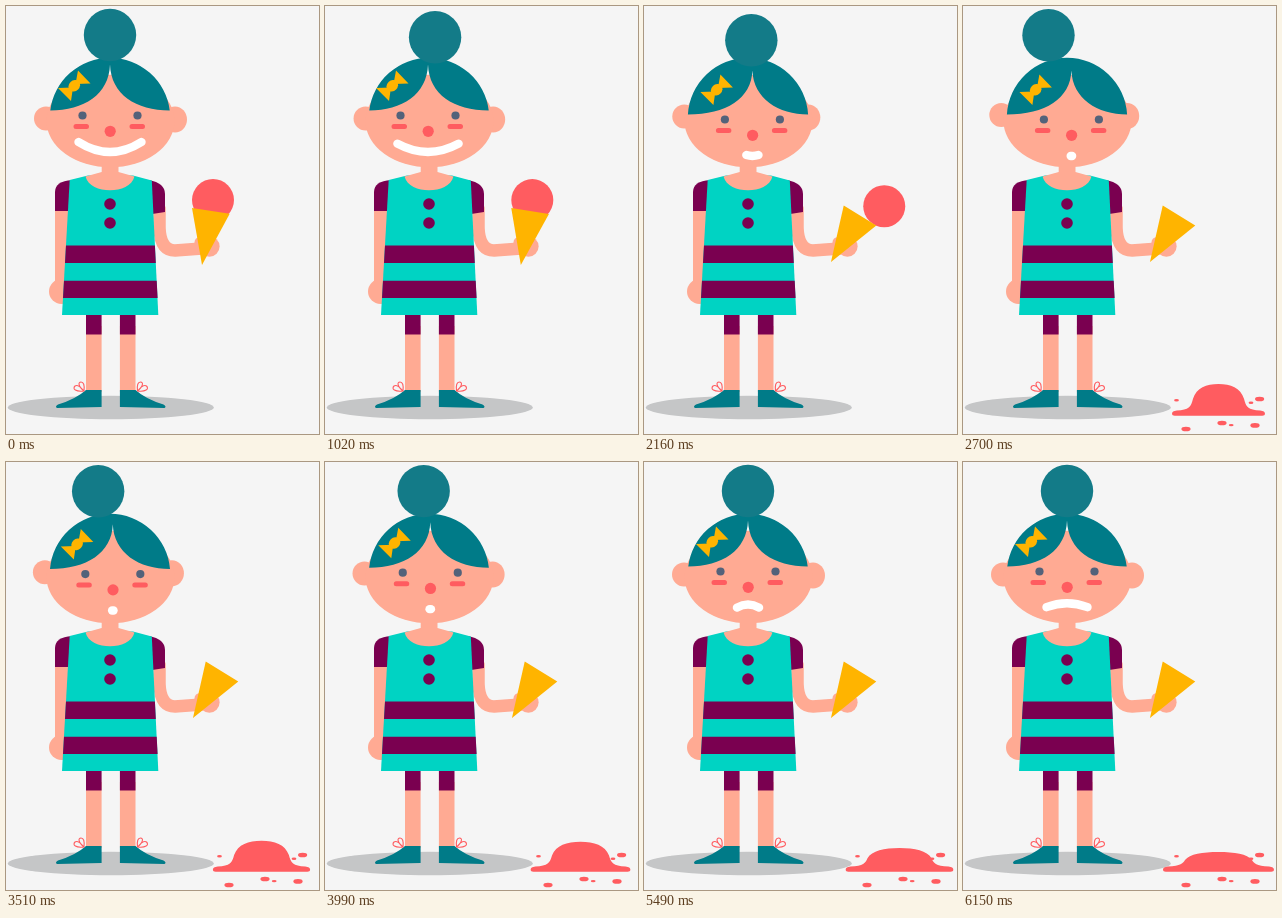
An HTML page that plays this animation: 313x428 px, repeating every 6300 ms.

```html
<!DOCTYPE html>
<html lang="en">
<head>
<meta charset="utf-8">
<title>Dropped ice cream</title>
<style>
  html, body { margin: 0; width: 100%; height: 100%; overflow: hidden; background: #f5f5f5; }
  svg { display: block; width: 100%; height: 100%; }
  .skin { fill: #ffaa93; }
  .teal { fill: #007b88; }
  .bun { fill: #137b88; }
  .plum { fill: #7a0050; }
  .red { fill: #ff5c60; }
  .gold { fill: #ffb400; }
  .eye { fill: #53627a; }
  .line { fill: none; stroke-linecap: round; }
</style>
</head>
<body>
<svg viewBox="0 0 313 428">
  <ellipse cx="104.8" cy="401.5" rx="103" ry="11.7" fill="#c5c6c7"/>

  <g id="leg">
    <path class="skin" d="M80 320H95.6V386H80Z"/>
    <path class="plum" d="M80 305H95.6V328.5H80Z"/>
    <path class="teal" d="M80 384H95.6V401L51 402Q48.500 400.500 52 398.500Q70 393 80 384Z"/>
    <path class="line" stroke="#ff5c60" stroke-width="1.1"
      d="M78 385C70 386 66 383 69 380Q72 378 78 385C72 380 72 376 75 376Q79 376 78 385"/>
  </g>
  <use href="#leg" transform="matrix(-1 0 0 1 209.500 0)"/>

  <g id="arms">
    <path class="skin" d="M49 200H62V292H49Z"/>
    <circle class="skin" cx="55.500" cy="285.500" r="12.500"/>
    <path class="line" d="M153.500 203V222Q154.500 244.500 169 244.500L196 242.500" stroke="#ffaa93" stroke-width="12.500"/>
    <circle class="skin" cx="203.400" cy="240.500" r="10.200"/>
    <circle class="skin" cx="194" cy="236.500" r="5.500"/>
    <path class="plum" d="M66 174Q49 175 49 186V205H66Z"/>
    <path class="plum" d="M143 174Q159 177 159 188V206L143 208.500Z"/>
  </g>

  <g id="dress">
    <path fill="#00d3c3" d="M63.700 174L82 169.500H127L145.800 174.500L152.300 309H56Z"/>
    <path class="plum" d="M60 239.500H148.900L149.800 257H59ZM58 274.800H150.700L151.600 292H57Z"/>
    <circle class="plum" cx="104" cy="198" r="5.800"/>
    <circle class="plum" cx="104" cy="217" r="5.800"/>
    <path class="skin" d="M95.700 155H112.500V166L128.500 170.500C126 180 115 184.300 104 184.300S82 180 79.500 170.500L95.700 166Z"/>
  </g>

  <g id="head">
    <ellipse id="earL" class="skin" cx="40" cy="112.500" rx="12" ry="12"/>
    <ellipse id="earR" class="skin" cx="169" cy="113.500" rx="12" ry="13"/>
    <ellipse class="skin" cx="104.500" cy="115" rx="64" ry="46.300"/>
    <path id="hair" class="teal"/>
    <circle id="bun" class="bun" r="26.200"/>
    <g id="face">
      <path class="gold" d="M69.500 78L72 64.500L84.500 77.500ZM67 81.500L65 95L52 82Z"/>
      <ellipse class="gold" cx="68.300" cy="79.800" rx="6.300" ry="5.300" transform="rotate(-45 68.300 79.800)"/>
      <circle class="eye" cx="76.500" cy="109.500" r="4.100"/>
      <circle class="eye" cx="131.500" cy="109.500" r="4.100"/>
      <path class="line" d="M70 120.500H80.500M126 120.500H136.500" stroke="#ff5c60" stroke-width="5"/>
      <circle class="red" cx="104.200" cy="125.300" r="5.600"/>
      <path id="mouth" class="line" stroke="#fff" stroke-width="8.400"/>
    </g>
  </g>

  <circle id="scoop" class="red" r="21"/>
  <path id="cone" class="gold" d="M186 202L223.700 207.800L196 259Z"/>
  <path id="puddle" class="red"/>
  <g id="drops" class="red"></g>
</svg>
<script>
const LOOP = 6300;
// Moments of the story, in ms
const START = 840, LEANED = 1500, TIPPED = 2160, LANDED = 2520, SPLAT = 2700;
const CALM = 4700, SAD = 4800, END = 6120;
const PIVOT = { x: 199, y: 235 };
const BIG_DROPS = [[296.6, 393], [292, 419.4], [259, 417], [223, 423]];
const SMALL_DROPS = [[213.5, 394.3], [288, 396.7], [268.2, 419.1]];

const el = Object.fromEntries([...document.querySelectorAll("[id]")].map(n => [n.id, n]));
const set = (node, attrs) => Object.entries(attrs).forEach(([k, v]) => node.setAttribute(k, v));
const span = (t, a, b) => Math.min(1, Math.max(0, (t - a) / (b - a)));
const mix = (a, b, u) => a + (b - a) * u;
const ease = (t, a, b) => {
  const u = span(t, a, b);
  return u * u * (3 - 2 * u);
};

function makeDrop([x, y], r) {
  const node = document.createElementNS("http://www.w3.org/2000/svg", "ellipse");
  set(node, { rx: r, ry: r / 2 });
  el.drops.append(node);
  return { node, x, y };
}
const drops = [...BIG_DROPS.map(p => makeDrop(p, 4.6)), ...SMALL_DROPS.map(p => makeDrop(p, 2.4))];

// From rest to one side, over to the other, and back to rest
function sway(t, rest, first, second, arrival = SPLAT) {
  const out = mix(rest, first, ease(t, START, LEANED));
  const over = mix(out, second, ease(t, LEANED, arrival));
  return mix(over, rest, ease(t, SPLAT, CALM));
}

function drawHead(t) {
  const fx = sway(t, 0, -5.4, 4.4, TIPPED);
  const fy = sway(t, 0, 0, 4, TIPPED);
  const lift = sway(t, 0, 0, -3.5);
  set(el.bun, { cx: sway(t, 104, 137, 85.5), cy: sway(t, 29, 41, 29.3) });
  set(el.earL, { transform: `translate(${sway(t, 0, 3, -1.7)} ${lift})` });
  set(el.earR, { transform: `translate(${sway(t, 0, -4.5, -4.8)} ${lift})` });
  set(el.face, { transform: `translate(${fx} ${fy})` });

  const radius = 60.2, center = 112;
  const base = 104.5 + fy;
  const half = Math.sqrt(radius ** 2 - (center - base) ** 2);
  const [left, right] = [104 - half, 104 + half];
  const px = 104 + fx, py = 58.5 + fy * 1.5;
  set(el.hair, {
    d: `M${left} ${base}A${radius} ${radius} 0 0 1 ${right} ${base}` +
       `C${px + 26} ${base} ${px + 1} ${base - 16} ${px} ${py}` +
       `C${px - 1} ${base - 16} ${px - 26} ${base} ${left} ${base}Z`
  });
}

function drawMouth(t) {
  const shrink = ease(t, START, 2640);
  const frown = span(t, SAD, END);
  const w = mix(31.5, .7, shrink) + 19.8 * frown;
  const corner = mix(136, 146, Math.sqrt(shrink)) - .8 * frown;
  const middle = 146 - 4.8 * Math.sqrt(frown);
  set(el.mouth, { d: `M${104 - w} ${corner}Q104 ${2 * middle - corner} ${104 + w} ${corner}` });
}

function drawIceCream(t) {
  const angle = 22.7 * span(t, START, TIPPED) ** 2;
  const [sin, cos] = [Math.sin, Math.cos].map(f => f(angle * Math.PI / 180));
  const slide = 18 * span(t, 1700, TIPPED) ** 2;
  const fall = span(t, TIPPED, LANDED);
  const dx = 8, dy = -41;
  set(el.cone, { transform: `rotate(${angle} ${PIVOT.x} ${PIVOT.y})` });
  set(el.scoop, {
    cx: PIVOT.x + dx * cos - dy * sin + slide + 15 * fall,
    cy: PIVOT.y + dx * sin + dy * cos + 189 * fall ** 2,
    visibility: t < LANDED ? "visible" : "hidden"
  });
}

function drawPuddle(t) {
  const visibility = t < LANDED ? "hidden" : "visible";
  const grow = mix(.45, 1, ease(t, LANDED, 2670));
  const melt = span(t, SPLAT, END);
  const c = 255.5;
  const w = (46.7 + 9 * melt) * grow;
  const d = (25.5 + 8 * melt) * grow;
  const top = 378 + 12 * melt ** 2;
  const mid = mix(top, 404, .57);
  const side = s => `M${c} 409.7H${c + s * (w - 3)}` +
    `C${c + s * (w + 1)} 409.7 ${c + s * (w + 1)} 405 ${c + s * (w - 5)} 404.6` +
    `C${c + s * (d + 4)} 404 ${c + s * (d + 2)} 401 ${c + s * d} ${mid}` +
    `C${c + s * d * .86} ${mix(top, mid, .25)} ${c + s * d * .48} ${top} ${c} ${top}Z`;
  set(el.puddle, { d: side(-1) + side(1), visibility });

  const fly = span(t, LANDED, SPLAT);
  const hop = 60 * fly * (1 - fly);
  drops.forEach(({ node, x, y }) => set(node, { cx: mix(c, x, fly), cy: mix(400, y, fly) - hop }));
  set(el.drops, { visibility });
}

function tick() {
  const t = performance.now() % LOOP;
  drawHead(t);
  drawMouth(t);
  drawIceCream(t);
  drawPuddle(t);
  requestAnimationFrame(tick);
}
tick();
</script>
</body>
</html>
```
